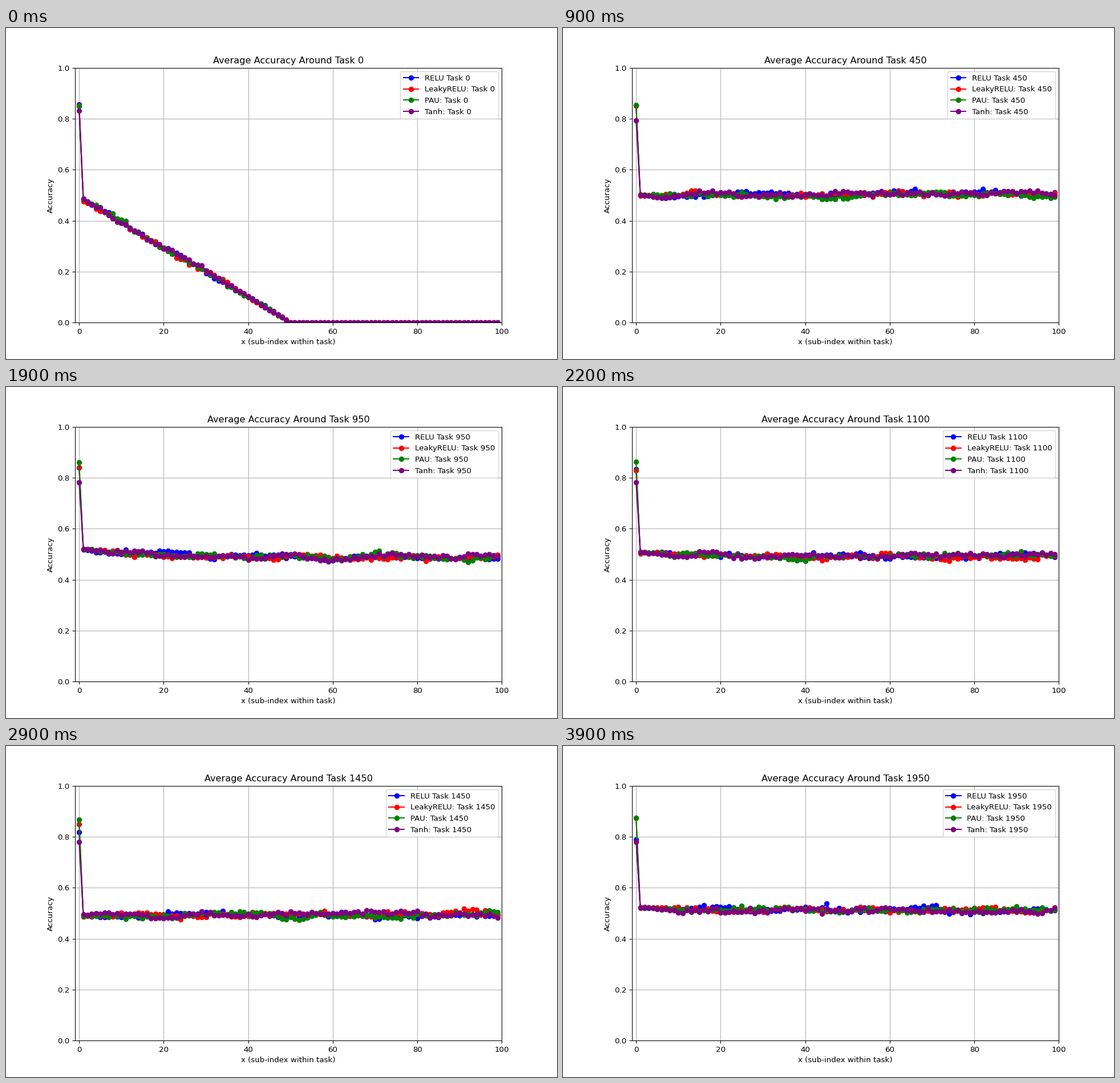
Write a matplotlib script that moves like this. It is 966 px wide and 580 px high and loops after 4000 ms.

```python
import numpy as np
import matplotlib.pyplot as plt
from matplotlib.animation import FuncAnimation

WIDTH, HEIGHT, DPI = 966, 580, 96.6
FRAMES, INTERVAL = 40, 100
TASK_STEP, HALF_WINDOW = 50, 50
SERIES = [("RELU", "blue"), ("LeakyRELU:", "red"), ("PAU:", "green"), ("Tanh:", "purple")]

x = np.arange(100)
steps = np.arange(FRAMES)
rng = np.random.default_rng(7)


def smooth_noise(shape, width):
    """Gaussian noise of unit spread, smoothed along x."""
    reach = np.arange(-3 * width, 3 * width + 1)
    kernel = np.exp(-.5 * (reach / width) ** 2)
    kernel /= np.sqrt((kernel ** 2).sum())
    raw = rng.normal(size=shape + (len(x) + len(reach) - 1,))
    return np.apply_along_axis(np.convolve, -1, raw, kernel, "valid")


def start_accuracy():
    """Accuracy right after training (x = 0), one column per series."""
    relu = .855 - .000044 * steps ** 2
    leaky = .852 - .025 * np.exp(-((steps - 23) / 5) ** 2) + .022 * (steps / 39) ** 6
    pau = .848 + .00065 * steps
    tanh = .78 + .052 * np.exp(-steps / 6.5)
    return np.stack([relu, leaky, pau, tanh], axis=1)


def shared_level():
    """Level common to all series, moving from head to tail along x."""
    keys = [0, 5, 14, 19, 25, 33, 39]
    head = np.interp(steps, keys, [-.010, -.003, 0, .020, -.010, -.008, .022])
    tail = np.interp(steps, keys, [0, .006, .002, -.014, -.003, -.004, .012])
    mix = np.exp(-x / 20)
    return .5 + head[:, None] * mix + tail[:, None] * (1 - mix)


def series_noise():
    """Own wander of each series; neighbouring windows share half of their tasks."""
    shape = (FRAMES + 1, len(SERIES))
    blocks = .0045 * rng.normal(size=shape + (len(x),)) + .0055 * smooth_noise(shape, 3)
    noise = (blocks[:-1] + blocks[1:]) / np.sqrt(2)
    noise[0] = blocks[0] * np.sqrt(2)
    return noise * np.clip(x / 8, .3, 1)


def known_share():
    """Share of tasks in the window that are at least x steps old."""
    task = steps * TASK_STEP
    first, last = np.maximum(task - HALF_WINDOW, 0), task + HALF_WINDOW
    return np.clip((last[:, None] - x) / (last - first)[:, None], 0, 1)


def build_curves():
    known = known_share()[:, None, :]
    level = shared_level()[:, None, :]
    curves = np.maximum(known * level + np.sqrt(known) * series_noise(), 0)
    curves[:, :, 0] = start_accuracy()
    return curves


curves = build_curves()

# The tiny margin keeps the pixel size from being rounded down.
fig, ax = plt.subplots(figsize=((WIDTH + 1e-6) / DPI, (HEIGHT + 1e-6) / DPI), dpi=DPI)
lines = [ax.plot(x, curves[0, k], marker="o", color=color, label=f"{name} Task 0")[0]
         for k, (name, color) in enumerate(SERIES)]
ax.set_xlim(-1, 100)
ax.set_ylim(0, 1)
ax.set_xlabel("x (sub-index within task)")
ax.set_ylabel("Accuracy")
ax.grid(True)
title = ax.set_title("")
legend = ax.legend(loc="upper right")


def update(step):
    task = step * TASK_STEP
    title.set_text(f"Average Accuracy Around Task {task}")
    for line, curve, text, (name, _) in zip(lines, curves[step], legend.get_texts(), SERIES):
        line.set_ydata(curve)
        text.set_text(f"{name} Task {task}")
    return [*lines, title, legend]


anim = FuncAnimation(fig, update, frames=FRAMES, interval=INTERVAL, repeat=True, repeat_delay=0)
plt.show()
```
